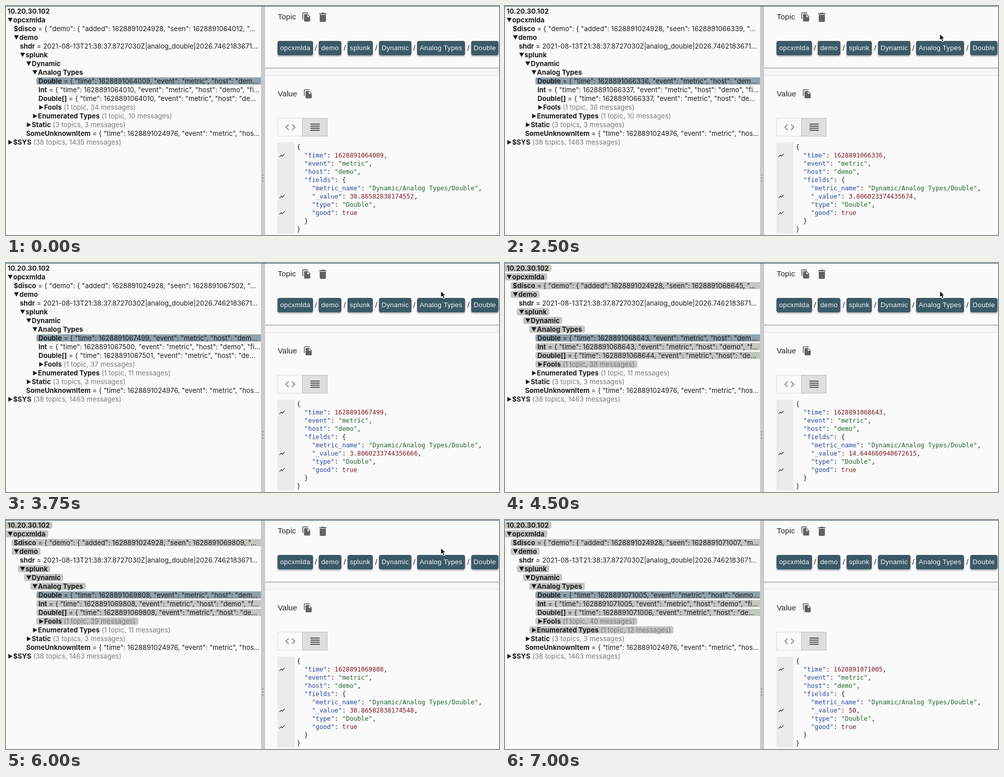
Write an HTML page that moves like this. It is 957 px wide and 446 px high and loops after 7250 ms.

```html
<!DOCTYPE html>
<html lang="en">
<head>
<meta charset="utf-8">
<title>Topic explorer</title>
<style>
html, body { margin: 0; width: 100%; height: 100%; overflow: hidden; }
#stage { position: relative; width: 957px; height: 446px; overflow: hidden; background: #fafafa; color: #222; }
#stage > *, #side > *, .row { position: absolute; }
#bar { left: 0; top: 0; width: 957px; height: 1px; background: #34596a; }

#tree { left: 0; top: 0; width: 495px; height: 446px; overflow: hidden;
  font: 13px/15px Inter, sans-serif; font-feature-settings: "calt" 0; letter-spacing: .05px;
  color: #1c1c1c; --glow: 0; }
.row { height: 14px; padding: 0 5px 0 4px; border-radius: 4px; white-space: pre; }
.row.wide { right: 0; padding-right: 0; border-radius: 4px 0 0 4px; }
.row.hot { background: rgb(195 199 193 / var(--glow)); }
.row.selected { background: #90a2ab; }
.row i { color: #7a7a7a; font-style: normal; }
.row svg { width: 11px; height: 11px; vertical-align: -1px; fill: #1c1c1c; }

#split { left: 495px; top: 1px; width: 8px; height: 445px; background: #cbcbcb; }
#split::after { content: ""; position: absolute; left: 2px; top: 325px; width: 3px; height: 17px;
  background: radial-gradient(circle, #969696 1.1px, transparent 1.6px) 0 0 / 3px 6px; }
#side { left: 503px; top: 1px; width: 454px; height: 445px; }
#gap { left: 0; top: 119px; width: 454px; height: 16px; box-sizing: border-box; background: #f6f6f6;
  border-top: 1px solid #a6a6a6; border-bottom: 1px solid #e2e2e2; box-shadow: inset 0 2px 2px -1px #ccc; }
.title { font: 15px/18px "Liberation Sans", Arial, sans-serif; letter-spacing: .1px; color: #252525; }
.chip, .slash { font: 13px/28px "Liberation Sans", Arial, sans-serif; text-align: center; }
.chip { top: 68px; height: 28px; border-radius: 4px; background: #3b5a68; color: #f5f7f8;
  letter-spacing: .37px; white-space: nowrap; box-shadow: 0 2px 3px rgba(0,0,0,.35); }
.slash { top: 68px; width: 10px; font-size: 15px; color: #222; }
.toggle { top: 218px; width: 49px; height: 36px; box-sizing: border-box; border: 1px solid #dcdcdc; }
.toggle.on { background: #dedede; border-color: #bdbdbd; }
#gutter { left: 527px; top: 266px; width: 33px; height: 177px; background: #ebebeb; }
#code { left: 564.4px; top: 266.5px; margin: 0; font: 12.2px/16px "DejaVu Sans Mono", monospace; color: #222; }
#code .k { color: #2947a0; }
#code .s { color: #23632c; }
#code .n { color: #7c1d26; }
#pointer { left: 842px; top: 52px; }
</style>
</head>
<body>
<div id="stage">
  <div id="tree"></div>
  <div id="split"></div>
  <div id="side"><div id="gap"></div></div>
  <div class="title" style="left:527.5px;top:12px">Topic</div>
  <div class="title" style="left:527.5px;top:162px">Value</div>
  <div class="toggle" style="left:527px"></div>
  <div class="toggle on" style="left:575px"></div>
  <div id="gutter"></div>
  <pre id="code"></pre>
  <svg id="icons" width="957" height="446" style="left:0;top:0"></svg>
  <div id="bar"></div>
  <svg id="pointer" width="16" height="22" viewBox="0 0 16 22">
    <path d="M2 2V15.2L5 12.5L7.2 17.6L9.6 16.5L7.4 11.5H11.4Z" fill="#0a0a0a" stroke="#fff" stroke-width="1.1" stroke-linejoin="round"/>
  </svg>
</div>
<script>
const LOOP = 7250;
const $ = id => document.getElementById(id);
const stamp = ms => 1628891000000 + ms;

// One entry per message: times of the four metrics, then the value
const updates = [
  [64009, 64010, 64010, 64012, '30.86582838174552'],
  [65168, 65169, 65169, 65171, '14.64466094067263'],
  [66336, 66337, 66337, 66339, '3.806023374435674'],
  [67499, 67500, 67501, 67502, '3.8060233744356666'],
  [68643, 68643, 68644, 68645, '14.644660940672615'],
  [69808, 69808, 69808, 69809, '30.86582838174548'],
  [71005, 71005, 71006, 71007, '50']
];
const codeTimes = [0, 750, 2000, 3000, 4250, 6000, 6750];
const treeTimes = [0, 1000, 2000, 3250, 4500, 6000, 6750];
const glowSteps = [[0, 0], [1000, 1], [1250, 0], [2000, .35], [2250, 1], [2500, 0], [3500, 1], [3750, 0],
  [4500, 1], [4750, .5], [5000, 0], [6000, 1], [6250, .5], [6500, 0], [7000, 1]];

const metric = (ms, end) => ` = { "time": ${stamp(ms)}, "event": "metric", "host": "${end}…`;
const count = (topics, n) => ` <i>(${topics}, ${n} messages)</i>`;
const arrows = { open: 'M0 1H9.4L4.7 9.6Z', shut: 'M1 .8V10L9.2 5.4Z' };

// depth, label, arrow, class, text after the label
const rows = [
  [0, '10.20.30.102', '', 'hot'],
  [0, 'opcxmlda', 'open', 'hot'],
  [1, '$disco', '', 'hot wide', n =>
    ` = { "demo": { "added": 1628891024928, "seen": ${stamp(updates[n][3])}, "${n == 1 || n == 6 ? 'm' : ''}…`],
  [1, 'demo', 'open', 'hot'],
  [2, 'shdr', '', 'wide', () => ' = 2021-08-13T21:38:37.8727030Z|analog_double|2026.7462183671…'],
  [2, 'splunk', 'open', 'hot'],
  [3, 'Dynamic', 'open', 'hot'],
  [4, 'Analog Types', 'open', 'hot'],
  [5, 'Double', '', 'selected wide', n => metric(updates[n][0], n == 6 ? 'demo' : 'dem')],
  [5, 'Int', '', 'hot wide', n => metric(updates[n][1], n == 4 || n == 5 ? 'demo", "f' : 'demo", "fi')],
  [5, 'Double[]', '', 'hot wide', n => metric(updates[n][2], 'de')],
  [5, 'Fools', 'shut', 'hot', n => count('1 topic', 34 + n)],
  [4, 'Enumerated Types', 'shut', '', n => count('1 topic', n < 3 ? 10 : n < 6 ? 11 : 12)],
  [3, 'Static', 'shut', '', () => count('3 topics', 3)],
  [3, 'SomeUnknownItem', '', 'wide', () => ' = { "time": 1628891024976, "event": "metric", "hos…'],
  [0, '$SYS', 'shut', '', (n, t) => count('38 topics', t < 2250 ? 1435 : 1463)]
];

const tails = rows.map(([depth, label, arrow, cls], i) => {
  const row = document.createElement('div');
  row.className = 'row ' + cls;
  row.style.left = 12 * depth - 1 + 'px';
  row.style.top = 3 + 17 * i + 'px';
  const mark = arrow && `<svg viewBox="-.5 0 11 11"><path d="${arrows[arrow]}"/></svg>`;
  row.innerHTML = `${mark}<b>${label}</b><span></span>`;
  $('tree').append(row);
  return row.lastChild;
});

function add(cls, text, left, width) {
  const el = document.createElement('div');
  el.className = cls;
  el.textContent = text;
  el.style.left = left + 'px';
  if (width) el.style.width = width + 'px';
  $('stage').insertBefore(el, $('bar'));
}
[['opcxmlda', 527, 69], ['demo', 607, 44], ['splunk', 663, 49], ['Dynamic', 724, 63],
 ['Analog Types', 798, 93], ['Double', 903, 53]].forEach(([text, x, w], i) => {
  add('chip', text, x, w);
  if (i) add('slash', '/', x - 10.5);
});

const copy = 'M16 1H4c-1.1 0-2 .9-2 2v14h2V3h12V1zm-1 4l6 6v10c0 1.1-.9 2-2 2H7.99C6.89 23 6 22.1 6 21l.01-14c0-1.1.89-2 1.99-2h7zm-1 7h5.5L14 6.5V12z';
const trash = 'M6 19c0 1.1.9 2 2 2h8c1.1 0 2-.9 2-2V7H6v12zM19 4h-3.5l-1-1h-5l-1 1H5v2h14V4z';
const angles = 'M9.4 16.6L4.8 12l4.6-4.6L8 6l-6 6 6 6 1.4-1.4zm5.2 0l4.6-4.6-4.6-4.6L16 6l6 6-6 6-1.4-1.4z';
const lines = 'M3 15h18v-2H3zM3 19h18v-2H3zM3 11h18V9H3zM3 5v2h18V5z';
const chart = 'M3.5 18.5l6-6 4 4L22 6.9l-1.4-1.4-7.1 8-4-4L2 17z';
const icon = (d, x, y, scale, fill) =>
  `<path d="${d}" fill="${fill}" transform="translate(${x} ${y}) scale(${scale})"/>`;
$('icons').innerHTML = icon(copy, 573.7, 11.8, .8, '#626262') + icon(trash, 603, 10, 1, '#626262') +
  icon(copy, 576.7, 161.4, .8, '#626262') + icon(angles, 540, 224, 1, '#8c8c8c') +
  icon(lines, 588, 224, 1, '#555') +
  [291, 371, 403].map(y => icon(chart, 529.5, y - 6.5, .53, '#222')).join('');

function codeHtml(n) {
  const paint = (cls, s) => `<span class="${cls}">${s}</span>`;
  const pair = (pad, key, cls, value, end = ',') =>
    ' '.repeat(pad) + paint('k', `"${key}"`) + ': ' + (cls ? paint(cls, value) : value) + end;
  return ['{',
    pair(2, 'time', 'n', stamp(updates[n][0])),
    pair(2, 'event', 's', '"metric"'),
    pair(2, 'host', 's', '"demo"'),
    pair(2, 'fields', '', '{', ''),
    pair(4, 'metric_name', 's', '"Dynamic/Analog Types/Double"'),
    pair(4, '_value', 'n', updates[n][4]),
    pair(4, 'type', 's', '"Double"'),
    pair(4, 'good', 'n', 'true', ''),
    '  }', '}'].join('\n');
}

const last = (times, t) => times.filter(x => x <= t).length - 1;
let shown = -1;

function draw(t) {
  const n = last(treeTimes, t);
  rows.forEach((row, i) => { if (row[4]) tails[i].innerHTML = row[4](n, t); });
  tails[12].parentNode.classList.toggle('hot', n == 3 || n == 6);
  tails[15].parentNode.classList.toggle('hot', t >= 2250 && t < 2500);
  $('tree').style.setProperty('--glow', glowSteps[last(glowSteps.map(s => s[0]), t)][1]);
  $('code').innerHTML = codeHtml(last(codeTimes, t));
  $('pointer').style.display = t >= 250 && t < 6750 ? '' : 'none';
}

const start = performance.now();
function tick() {
  // All changes fall on quarter seconds
  const step = Math.floor((performance.now() - start) % LOOP / 250);
  if (step !== shown) draw((shown = step) * 250);
  requestAnimationFrame(tick);
}
tick();
</script>
</body>
</html>
```
